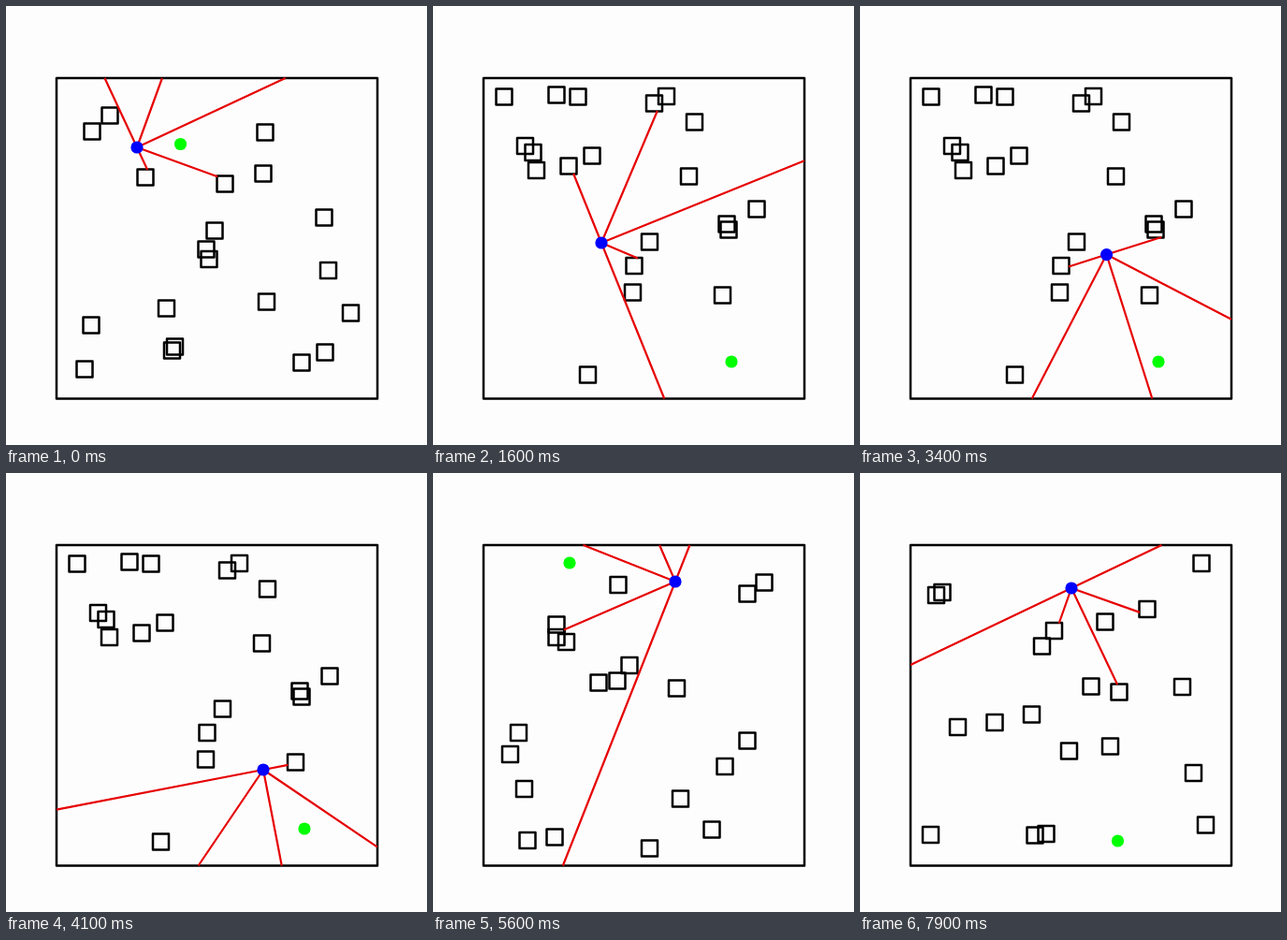
An HTML page with a canvas that plays this animation: 450x469 px, repeating every 8 s.

```html
<!DOCTYPE html>
<html>
<head>
<meta charset="utf-8">
<style>
html, body { margin: 0; width: 100%; height: 100%; overflow: hidden; background: #fefdfe; }
canvas { display: block; }
</style>
</head>
<body>
<canvas id="stage" width="450" height="469"></canvas>
<script>
const ctx = document.getElementById('stage').getContext('2d');
const LOOP = 8000, STEP = 100, HALF = 8.5, HIT = 8;
const ROOM = { left: 54, top: 77, right: 397, bottom: 419.5 };

// Each path key: time, x, y, heading in degrees.
const scenes = [
  {
    goal: [186.5, 147.5],
    boxes: '111,117 92,134 277,135 149,183 234,190 275,179 340,226 223,240 214,260 217,270.5 344.5,282.5 278.5,316 368.5,328 171.5,323 91,341 180.5,364 177.5,368 341,370 316,381 84,388',
    path: [[0, 140, 151, -25], [100, 146, 148.5, -20]]
  },
  {
    goal: [319, 380],
    boxes: '76,97 132,95 155,97 249.5,96.5 236.5,104 279.5,124 98.5,149.5 107,156.5 110.5,175.5 145,171 170,160 273.5,182 346,217 314,233 316,239 231.5,252 215,277.5 213.5,306 309.5,309 165.5,394',
    path: [[100, 98, 232, 0], [900, 143, 236, 8], [1200, 160, 243, 36], [1600, 180, 253, -22],
           [2700, 237, 226, 24.6], [4100, 275, 317, 79.1], [4500, 286, 342, 60]]
  },
  {
    goal: [146, 96],
    boxes: '198,119.5 354,117 336,129 132,162 132,175.5 142.5,180.5 210,205.5 197,222 177,224 260.5,230 91.5,277.5 82.5,300.5 336,286 312,313.5 97.5,337.5 264.5,348 298,381 130,389 101,392.5 231.5,401',
    path: [[4500, 315, 100, 110], [5600, 259, 116, 201.6], [6900, 181, 141, 194.6], [7200, 163, 131, 222]]
  },
  {
    goal: [275.5, 393],
    boxes: '365,96.5 88,127.5 81.5,130.5 307,145.5 262,159 207.5,168.5 194.5,185 247,228 277,234 344.5,228.5 183.5,258 144,266.5 104.5,271.5 223.5,297 267.5,292 356.5,320.5 369.5,376 75.5,386.5 187,387 199,385.5',
    path: [[7200, 186, 106, 20], [7900, 226, 123, 64.5], [8000, 229, 129, 65]]
  }
];
for (const s of scenes) s.boxes = s.boxes.split(' ').map(p => p.split(',').map(Number));

// Hermite curve whose tangent is also the heading.
function poseAt(path, t) {
  let i = 0;
  while (i < path.length - 2 && t >= path[i + 1][0]) i++;
  const [t0, x0, y0, a0] = path[i], [t1, x1, y1, a1] = path[i + 1];
  const u = (t - t0) / (t1 - t0), pull = 0.85 * Math.hypot(x1 - x0, y1 - y0);
  const axis = (p, q, f) => {
    const m = pull * f(a0 * Math.PI / 180), n = pull * f(a1 * Math.PI / 180);
    const c = 3 * (q - p) - 2 * m - n, d = 2 * (p - q) + m + n;
    return [p + u * (m + u * (c + u * d)), m + u * (2 * c + 3 * u * d)];
  };
  const [x, dx] = axis(x0, x1, Math.cos), [y, dy] = axis(y0, y1, Math.sin);
  return { x, y, heading: Math.atan2(dy, dx) };
}

// Entry and exit distances of a ray through a rectangle.
function span(x, y, dx, dy, r) {
  const a = (r.left - x) / dx, b = (r.right - x) / dx;
  const c = (r.top - y) / dy, d = (r.bottom - y) / dy;
  return [Math.max(Math.min(a, b), Math.min(c, d)), Math.min(Math.max(a, b), Math.max(c, d))];
}

function castRay({ x, y }, angle, boxes) {
  const dx = Math.cos(angle) || 1e-9, dy = Math.sin(angle) || 1e-9;
  let reach = span(x, y, dx, dy, ROOM)[1];
  for (const [bx, by] of boxes) {
    const [near, far] = span(x, y, dx, dy,
      { left: bx - HIT, right: bx + HIT, top: by - HIT, bottom: by + HIT });
    if (near > 0 && near <= far) reach = Math.min(reach, near);
  }
  return [x + dx * reach, y + dy * reach];
}

function dot(x, y, color) {
  ctx.fillStyle = color;
  ctx.beginPath();
  ctx.arc(x, y, 6.6, 0, 2 * Math.PI);
  ctx.fill();
}

function draw(t) {
  const scene = scenes.findLast(s => t >= s.path[0][0]);
  const robot = poseAt(scene.path, t);
  ctx.fillStyle = '#fefdfe';
  ctx.fillRect(0, 0, 450, 469);

  ctx.lineJoin = 'round';
  ctx.strokeStyle = '#000';
  ctx.lineWidth = 2.5;
  ctx.strokeRect(ROOM.left, ROOM.top, ROOM.right - ROOM.left, ROOM.bottom - ROOM.top);
  for (const [x, y] of scene.boxes) ctx.strokeRect(x - HALF, y - HALF, 2 * HALF, 2 * HALF);

  ctx.strokeStyle = '#e60000';
  ctx.lineWidth = 2.2;
  ctx.beginPath();
  for (let k = -2; k <= 2; k++) {
    ctx.moveTo(robot.x, robot.y);
    ctx.lineTo(...castRay(robot, robot.heading + k * Math.PI / 4, scene.boxes));
  }
  ctx.stroke();

  dot(...scene.goal, '#00ff00');
  dot(robot.x, robot.y, '#0000ff');
}

const start = performance.now();
function tick() {
  const t = (performance.now() - start) % LOOP;
  draw(Math.floor(t / STEP) * STEP);
  requestAnimationFrame(tick);
}
tick();
</script>
</body>
</html>
```
